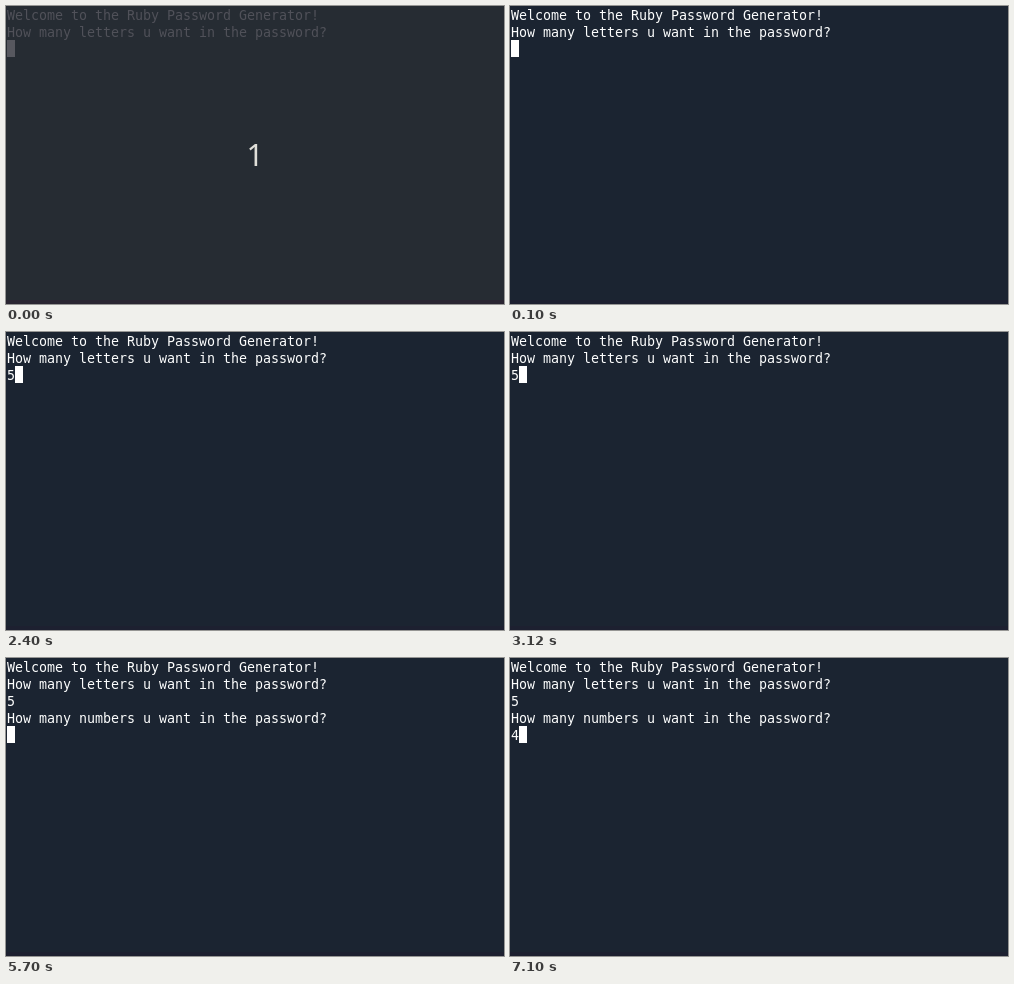
Write an HTML page with a canvas that moves like this. It is 498x298 px and loops after 8000 ms.

```html
<!DOCTYPE html>
<html lang="en">
<head>
<meta charset="utf-8">
<title>Password generator terminal</title>
<style>
  html, body { margin: 0; width: 100%; height: 100%; overflow: hidden; background: #1b2431; }
  canvas { display: block; }
</style>
</head>
<body>
<canvas id="stage" width="498" height="298"></canvas>
<script>
const ctx = document.getElementById('stage').getContext('2d');
const LOOP = 8000;
const CELL = { w: 8, h: 17, left: 1, baseline: 14 };

const LIVE = { back: '#1b2431', edge: '#1d2030', text: '#fcfdfd', cursor: '#ffffff' };
const DIMMED = { back: '#262c33', edge: '#2a2532', text: '#505159', cursor: '#57585f' };

// Terminal output; each entry is appended at its time.
const OUTPUT = [
  [0, 'Welcome to the Ruby Password Generator!\nHow many letters u want in the password?\n'],
  [2400, '5'],
  [3600, '\nHow many numbers u want in the password?\n'],
  [7100, '4']
];
const COUNTDOWN_END = 100;

function drawLine(text, row) {
  [...text].forEach((char, col) => {
    ctx.fillText(char, CELL.left + col * CELL.w, row * CELL.h + CELL.baseline);
  });
}

function drawTerminal(time, theme) {
  ctx.fillStyle = theme.back;
  ctx.fillRect(0, 0, 498, 298);
  ctx.fillStyle = theme.edge;
  ctx.fillRect(0, 294, 498, 4);

  const shown = OUTPUT.filter(([start]) => time >= start).map(([, text]) => text).join('');
  const lines = shown.split('\n');
  ctx.font = '13.333px "DejaVu Sans Mono", monospace';
  ctx.textAlign = 'left';
  ctx.fillStyle = theme.text;
  lines.forEach(drawLine);

  const row = lines.length - 1;
  ctx.fillStyle = theme.cursor;
  ctx.fillRect(CELL.left + lines[row].length * CELL.w, row * CELL.h, CELL.w, CELL.h);
}

function drawCountdown() {
  ctx.font = '30px "Noto Sans", sans-serif';
  ctx.textAlign = 'center';
  ctx.fillStyle = '#e0dfd9';
  ctx.fillText('1', 249, 160);
}

function render(now) {
  const time = now % LOOP;
  const counting = time < COUNTDOWN_END;
  drawTerminal(time, counting ? DIMMED : LIVE);
  if (counting) drawCountdown();
}

function tick() {
  render(performance.now());
  requestAnimationFrame(tick);
}
tick();
</script>
</body>
</html>
```
